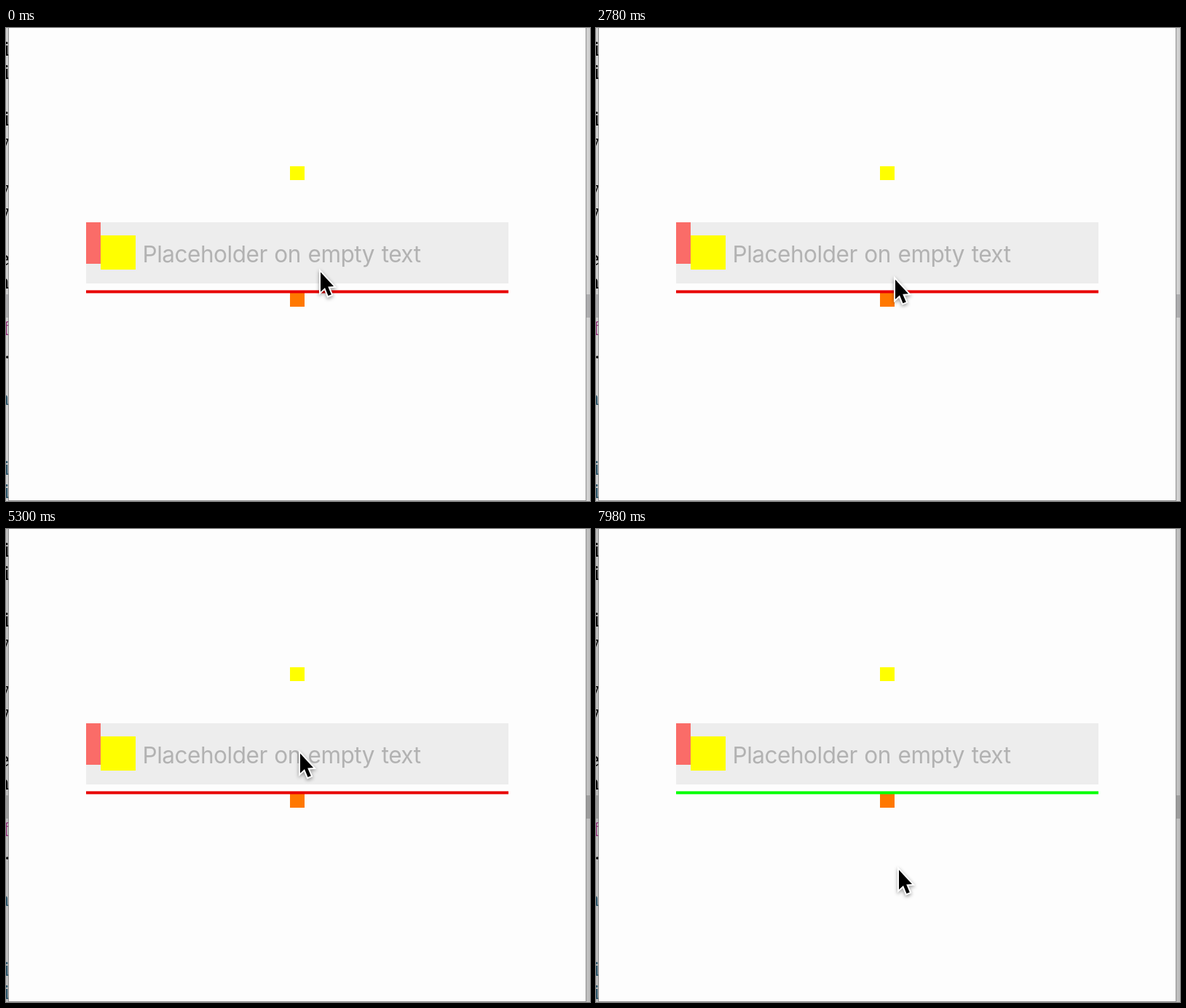
Animation of 802x650 px, one loop 8000 ms. Source, as an HTML page with a canvas:

```html
<!DOCTYPE html>
<html lang="en">
<head>
<meta charset="utf-8">
<title>Floating label text field</title>
<style>
html, body { margin: 0; width: 100%; height: 100%; overflow: hidden; background: #fdfdfd; }
canvas { display: block; }
</style>
</head>
<body>
<canvas id="stage" width="802" height="650"></canvas>
<script>
const ctx = document.getElementById('stage').getContext('2d');
const LOOP = 8000;
const DIM_AT = 4500;
const FOCUS_AT = 5420;
const BLUR_AT = 7620;
const FADE = 250;

const GREY = [178, 178, 178];
const BLACK = [0, 0, 0];
const RED = [232, 0, 0];
const GREEN = [0, 255, 0];

const ARROW = new Path2D('M0 0V27L6 21.4L10.5 32.5L14.8 30.7L10.2 20L18 19.5Z');

// Resting points of the pointer
const STOPS = [
  { t: 0, x: 431, y: 333 },
  { t: 450, x: 425, y: 384 },
  { t: 720, x: 421, y: 366 },
  { t: 2220, x: 415, y: 347 },
  { t: 3480, x: 403, y: 338 },
  { t: 5300, x: 403, y: 306 },
  { t: 6320, x: 403, y: 312 },
  { t: 6720, x: 415, y: 466 },
  { t: LOOP, x: 415, y: 466 }
];

// Line ends of the code behind the window, one character per row
const CODE = 'ii iv vy en f. a  ii';

const lerp = (a, b, k) => a + (b - a) * k;
const ease = k => k * k * (3 - 2 * k);
const ramp = (t, from, span) => ease(Math.min(1, Math.max(0, (t - from) / span)));
const mix = (a, b, k) => `rgb(${a.map((v, i) => Math.round(lerp(v, b[i], k)))})`;

function box(x, y, w, h, color, alpha = 1) {
  ctx.globalAlpha = alpha;
  ctx.fillStyle = color;
  ctx.fillRect(x, y, w, h);
  ctx.globalAlpha = 1;
}

function label(text, x, y, color, alpha = 1) {
  ctx.globalAlpha = alpha;
  ctx.font = '400 31.5px Inter, "Open Sans", sans-serif';
  ctx.letterSpacing = '-0.47px';
  ctx.wordSpacing = '1.2px';
  ctx.textAlign = 'left';
  ctx.fillStyle = color;
  ctx.fillText(text, x, y);
  ctx.letterSpacing = ctx.wordSpacing = '0px';
  ctx.globalAlpha = 1;
}

function codeColor(char, row) {
  if (char === 'f') return '#94307c';
  return row > 14 ? '#30586c' : '#000';
}

function drawBackdrop(t) {
  const dim = t >= DIM_AT;
  box(0, 0, 802, 650, dim ? '#bebebe' : '#d0d0d0');
  box(0, 366, 802, 32, dim ? '#9c9c9c' : '#acacae');
  ctx.font = '26px "Noto Serif", serif';
  ctx.textAlign = 'right';
  [...CODE].forEach((char, row) => {
    ctx.fillStyle = codeColor(char, row);
    ctx.fillText(char, 5, 38 + row * 32);
  });
  box(3, 0, 794, 650, '#909090');
  box(4, 0, 792, 649, '#fdfdfd');
}

function drawField(t) {
  const open = ramp(t, FOCUS_AT, FADE) * (1 - ramp(t, BLUR_AT, FADE));
  const idle = t < FOCUS_AT + FADE ? RED : GREEN;
  box(390, 190, 20, 19, '#ffff00');
  box(110, 267, 580, 84, '#ededed');
  box(110, 267, 20, 57, '#fa6c68');
  box(130, 285, 48, 47, '#ffff00');
  box(671, 267, 19, 84, '#6cf96c', open);
  label('Placeholder', 187.5, 322, mix(GREY, GREY, 1), open);
  box(369, 313, 29, 38, '#ff00f8', open);
  label('Placeholder on empty text', lerp(187.5, 110.5, open), lerp(322, 241, open), mix(GREY, BLACK, open));
  box(390, 364, 20, 19, '#ff7800');
  box(110, 360.4, 580, 4, mix(idle, BLACK, open));
  box(187, 287, 4, 41, '#4664bc', open);
}

function pointerAt(t) {
  const i = STOPS.findIndex(stop => stop.t > t);
  const a = STOPS[i - 1], b = STOPS[i];
  const k = ramp(t, a.t, b.t - a.t);
  return [lerp(a.x, b.x, k), lerp(a.y, b.y, k)];
}

function drawPointer(t) {
  const [x, y] = pointerAt(t);
  ctx.save();
  ctx.translate(x + 1, y + 2.5);
  ctx.lineJoin = 'miter';
  ctx.miterLimit = 3;
  ctx.lineWidth = 4;
  ctx.strokeStyle = '#fff';
  ctx.shadowColor = 'rgba(0, 0, 0, 0.4)';
  ctx.shadowBlur = 5;
  ctx.shadowOffsetY = 2;
  ctx.stroke(ARROW);
  ctx.shadowColor = 'transparent';
  ctx.fillStyle = '#000';
  ctx.fill(ARROW);
  ctx.restore();
}

const start = performance.now();

function frame() {
  const t = (performance.now() - start) % LOOP;
  drawBackdrop(t);
  drawField(t);
  drawPointer(t);
  requestAnimationFrame(frame);
}
frame();
</script>
</body>
</html>
```
